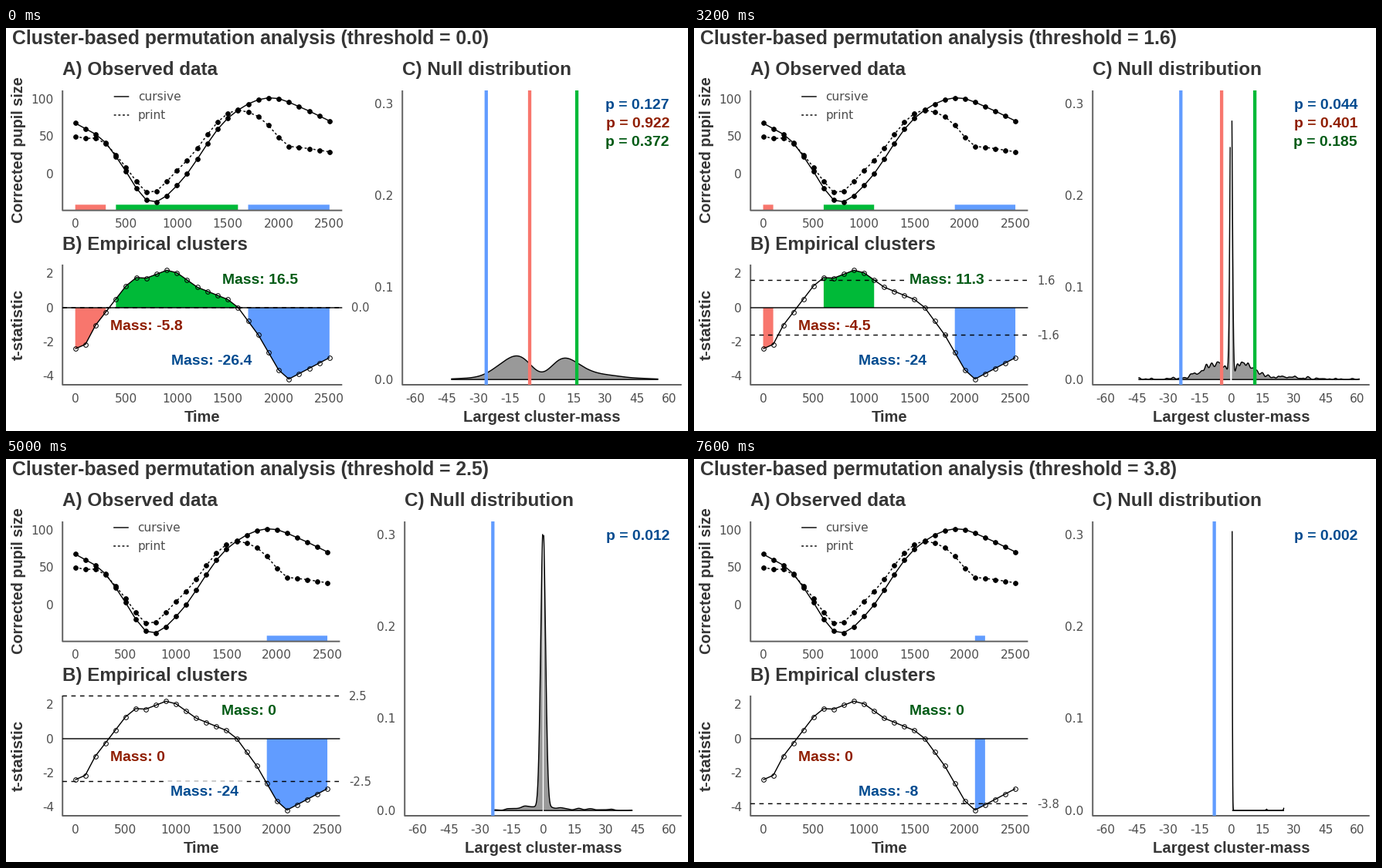
A matplotlib script for the animation above (7800 ms loop, 883 px wide and 523 px high).

```python
import numpy as np
import matplotlib.pyplot as plt
from matplotlib.animation import FuncAnimation
from matplotlib.patches import Rectangle

W, H, DPI = 883, 523, 64
PT = 72 / DPI  # points per pixel
LINE = 1.42 * PT
SANS, WIDE = "Liberation Sans", "DejaVu Sans"
INK, GREY, AXIS = "#353535", "#4d4d4d", "#646464"
SHORT, LONG = dict(dashes=(2, 2)), dict(dashes=(4, 4))
plt.rcParams["path.snap"] = False


def smooth(x, keys):
    """Cubic Hermite curve through (x, y) key points."""
    kx, ky = np.array(keys, float).T
    m = np.gradient(ky, kx)
    i = np.clip(np.searchsorted(kx, x, side="right") - 1, 0, len(kx) - 2)
    h = kx[i + 1] - kx[i]
    u, s = (x - kx[i]) / h, (ky[i + 1] - ky[i]) / h
    bend = (1 - u) * (m[i] - s) - u * (m[i + 1] - s)
    return ky[i] + s * h * u + h * u * (1 - u) * bend


def linear(x, keys):
    return np.interp(x, *zip(*keys))


# Observed curves: the t-statistic is the difference over its standard error
time = np.arange(0, 2501, 100)
tstat = linear(time / 100, [
    (0, -2.4), (1, -2.14), (2, -1.02), (5, 1.28), (6, 1.76), (7, 1.73),
    (9, 2.19), (10, 2.04), (12, 1.2), (15, .48), (16, .02), (18, -1.59),
    (20, -3.64), (21, -4.17), (25, -2.92)])
cursive = smooth(time, [(0, 68), (300, 41.6), (500, 3), (700, -35.3), (800, -37.4),
                        (1000, -15.7), (1500, 74.7), (1950, 102), (2200, 90.2),
                        (2500, 71)])
error = 14.2 - 10 * np.exp(-((time - 400) / 650) ** 2)
printed = cursive + tstat * error

# Clusters: index span, fill, text colour, label position, p baseline, p keys
CLUSTERS = [
    dict(span=(17, 26), fill="#619CFF", ink="#004A8F", at=(900, 437), row=105,
         p=[(0, .127), (.5, .111), (1.1, .076), (1.6, .044), (2.2, .018),
            (2.9, .005), (3.8, .002)]),
    dict(span=(0, 4), fill="#F8766D", ink="#8F1D00", at=(300, 391.7), row=129,
         p=[(0, .922), (.5, .858), (1.1, .659), (1.6, .401), (2.1, .195)]),
    dict(span=(4, 17), fill="#00BA38", ink="#005A14", at=(1400, 331.7), row=153,
         p=[(0, .372), (.5, .321), (1.1, .242), (1.6, .185), (2, .287)]),
]

# Null distribution: permutations without a cluster are zero, others log-normal
N, LIMIT = 1000, .305
rng = np.random.default_rng(12)
side = np.where(np.arange(N) % 2, 1, -1)
z = rng.normal(size=N)
z = np.where(z > np.where(side > 0, 2.5, 2.05), -z, z)
z[-3:], side[-3:] = (.8, 1.75, 1.75), 1


def null_density(th):
    zeros = int(N * min(1 - np.exp(-(th / 1.855) ** 2.6), .997))
    mu = 2.2 + .4 * np.exp(-(th / .7) ** 2) + .02 * th ** 2
    sigma = .58 + .19 * np.sin(np.pi * th / 2.9)
    mass = side * np.exp(mu + sigma * z)
    mass[:zeros] = 0

    # Rule-of-thumb bandwidth; falls back to the deviation if the quartiles meet
    q1, q3 = np.quantile(mass, [.25, .75])
    spread = min(mass.std(), (q3 - q1) / 1.34) or mass.std()
    h = .9 * spread * N ** -.2

    x = np.linspace(mass.min(), mass.max(), 512)
    y = np.exp(-.5 * ((x[:, None] - mass) / h) ** 2).mean(axis=1)
    y /= h * np.sqrt(2 * np.pi)
    return x, np.where(y > LIMIT, np.nan, y)


fig = plt.figure(figsize=(W / DPI, H / DPI), dpi=DPI, facecolor="white")
ax = fig.add_axes([0, 0, 1, 1])


def y_a(v):
    return 189.3 - .968 * v


def y_b(v):
    return 363 - 22.2 * v


def y_c(v):
    return 456.2 - 1193 * v


def text(x, y, s, size, color=INK, font=SANS, bold=True, ha="left", rot=0):
    return ax.text(x, y, s, fontsize=size * PT, color=color, family=font, ha=ha,
                   va="baseline", weight="bold" if bold else "normal",
                   rotation=rot, rotation_mode="anchor", zorder=9)


def tick(x, y, s, ha="center", size=15.4):
    text(x, y, s, size, GREY, WIDE, False, ha)


def line(x, y, color="black", width=LINE, z=4, **kw):
    ax.plot(x, y, color=color, lw=width, zorder=z, solid_capstyle="butt",
            dash_capstyle="butt", **kw)


def dots(x, y, fill):
    ax.plot(x, y, "o", ms=5.7 * PT, mfc=fill, mec="black", mew=PT, zorder=5)


def area(x, base, y, color, z=1):
    ax.fill_between(x, base, y, fc=color, ec="none", lw=0, zorder=z)


def frame_axes(left, right, top, bottom):
    line([left, left, right], [top, bottom, bottom], AXIS, 2 * PT, 3)


def box(x, y, w, h, color, z=1):
    ax.add_patch(Rectangle((x, y), w, h, fc=color, ec="none", lw=0, zorder=z))


def draw_cluster(c, th, px, cx):
    a, b = c["span"]
    hit = a + np.flatnonzero(np.abs(tstat[a:b]) >= th)
    mass = 0
    if len(hit) > 1:
        mass = tstat[hit].sum()
        xs = px(time[hit])
        box(xs[0], 229.3, xs[-1] - xs[0], 7.2, c["fill"])
        area(xs, y_b(0), y_b(tstat[hit]), c["fill"])
        line([cx(mass)] * 2, [81, 463], c["fill"], 4.3 * PT, 6)
        text(859, c["row"], f"p = {linear(th, c['p']):.3f}", 19.4, c["ink"],
             ha="right")
    t, base = c["at"]
    label = text(px(t) + 6.3, base, f"Mass: {round(mass, 1):g}", 19.4, c["ink"])
    box(px(t), base - 18.8, label.get_window_extent().width + 12.6, 24.4, "white", 7)


def draw(k):
    th = k / 10
    # The narrow "0.0" label leaves the panels slightly more room
    right, left_c = (435.3, 513.2) if k == 0 else (432.4, 516.2)
    px = lambda t: 73.2 + (t + 125) * (right - 73.2) / 2750
    cx = lambda m: left_c + (m + 66) * (874.7 - left_c) / 132

    ax.clear()
    ax.set(xlim=(0, W), ylim=(H, 0))
    ax.axis("off")

    text(8, 21, f"Cluster-based permutation analysis (threshold = {th:.1f})", 24.7)
    text(73, 61, "A) Observed data", 24.3)
    text(73, 288, "B) Empirical clusters", 24.1)
    text(left_c, 61, "C) Null distribution", 24.2)
    text(22, 158.5, "Corrected pupil size", 19.9, ha="center", rot=90)
    text(22, 385, "t-statistic", 20.8, ha="center", rot=90)
    text(px(1250), 511, "Time", 20.1, ha="center")
    text(cx(0), 511, "Largest cluster-mass", 20.2, ha="center")

    frame_axes(73.2, right, 81, 236.7)
    frame_axes(73.2, right, 307, 463)
    frame_axes(left_c, 874.7, 81, 463)
    for t in range(0, 2501, 500):
        tick(px(t), 259, str(t))
        tick(px(t), 486, str(t))
    for v in range(0, 101, 50):
        tick(62, y_a(v) + 5.6, str(v), "right")
    for v in range(-4, 3, 2):
        tick(62, y_b(v) + 5.6, str(v), "right")
    for m in range(-60, 61, 15):
        tick(cx(m), 486, str(m))
    for i in range(4):
        tick(left_c - 11.7, y_c(i / 10) + 5.6, f"{i / 10:.1f}", "right")

    # Panel A
    key = px(380)
    for values, name, y, style in ((cursive, "cursive", 89, {}),
                                   (printed, "print", 113, SHORT)):
        line(px(time), y_a(values), **style)
        dots(px(time), y_a(values), "black")
        line([key, key + 19.6], [y, y], **style)
        tick(key + 31.3, y + 5, name, "left")

    # Panel B
    line([73.2, right], [y_b(0)] * 2)
    for v in {th, -th}:
        if v <= 2.5:
            line([73.2, right], [y_b(v)] * 2, **LONG)
            tick(right + 11.7, y_b(v) + 5.3, f"{v:.1f}", "left", 14.7)
    line(px(time), y_b(tstat))
    dots(px(time), y_b(tstat), "none")

    # Panel C
    x, y = null_density(th)
    base = y_c(0 * y)
    area(cx(x), base, y_c(y), "#999999", 2)
    line(cx(x), y_c(y))
    line(cx(x), base)

    for c in CLUSTERS:
        draw_cluster(c, th, px, cx)
    return []


anim = FuncAnimation(fig, draw, frames=39, init_func=lambda: draw(0),
                     interval=200, repeat=True, repeat_delay=0, blit=False)
plt.show()
```
